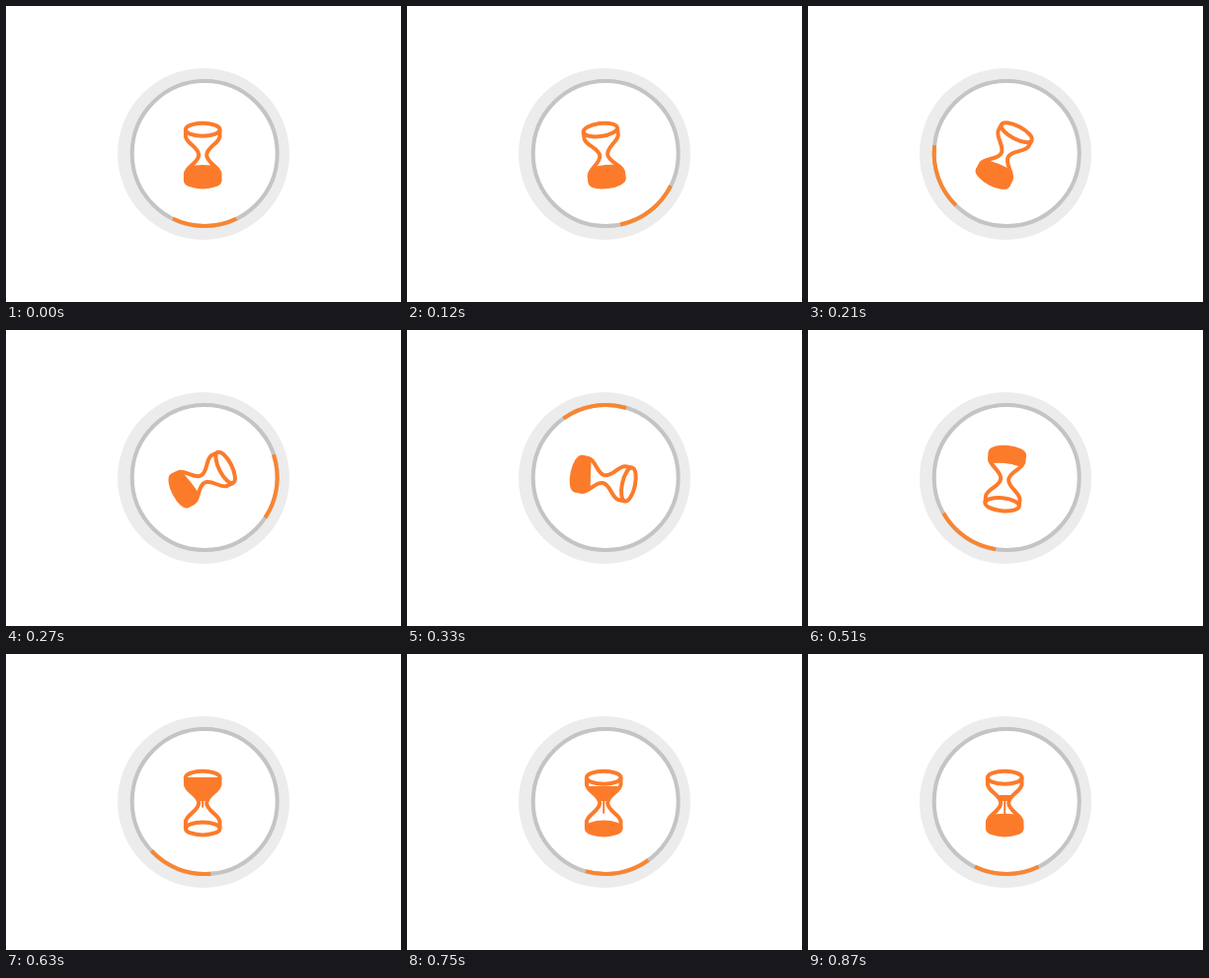
Write an HTML page with a canvas that moves like this. It is 400 px wide and 300 px high and loops after 0.9 s.

```html
<!DOCTYPE html>
<html lang="en">
<head>
<meta charset="utf-8">
<title>Hourglass loader</title>
<style>
  html, body { margin: 0; width: 400px; height: 300px; overflow: hidden; background: #fff; }
  canvas { display: block; }
</style>
</head>
<body>
<canvas id="stage" width="400" height="300"></canvas>
<script>
const ctx = document.getElementById('stage').getContext('2d');
const LOOP = 900, STEP = 30, POUR = 540;
const ORANGE = '#fc7b2b', ARC = '#f98530';
const RIM = { x: 17.3, y: 6.5, at: 25.8 };
const rad = Math.PI / 180;

// One half of the glass, from rim to neck; turned by 180 degrees for the other.
const half = new Path2D(`M-17.3,-25.8 V-19 C-17,-12 -4,-8 -4,0 H4 C4,-8 17,-12 17.3,-19
  V-25.8 A17.3,6.5 0 0 0 -17.3,-25.8 Z`);
const wall = new Path2D('M-17.3,-25.8 V-19 C-17,-12 -4,-8 -4,0 C-4,8 -17,12 -17.3,19 V25.8');
const body = new Path2D(half);
body.addPath(half, new DOMMatrix([-1, 0, 0, -1, 0, 0]));

// Eases from 0 to 1 between two times; a higher power gives a steeper middle.
function ease(t, start, end, power = 2) {
  const u = Math.min(1, Math.max(0, (t - start) / (end - start)));
  return u ** power / (u ** power + (1 - u) ** power);
}

// Both turns wind back, swing past the end and settle.
const spin = t => -47 * ease(t, 0, 110) + 802 * ease(t, 35, 540, 2.78)
  - 45 * ease(t, 550, 750) + 10 * ease(t, 750, 870);
const tilt = t => -14.5 * ease(t, 0, 110) + 204 * ease(t, 75, 540, 1.5)
  - 9.5 * ease(t, 540, 620);

function circle(x, y, r, from = 0, to = 360) {
  ctx.beginPath();
  ctx.arc(x, y, r, from * rad, to * rad);
}

function sand(end, surface, bulge, slope) {
  ctx.beginPath();
  ctx.moveTo(-20, end);
  ctx.lineTo(20, end);
  ctx.lineTo(20, surface - slope);
  ctx.quadraticCurveTo(0, surface + bulge, -20, surface + slope);
  ctx.fill();
}

function drawRing(t) {
  ctx.fillStyle = '#ececec';
  circle(200, 150, 87);
  ctx.fill();
  ctx.fillStyle = '#fff';
  ctx.strokeStyle = '#c4c4c4';
  ctx.lineWidth = 4;
  circle(201.2, 149.5, 73.5);
  ctx.fill();
  ctx.stroke();
  const middle = 90 + spin(t);
  ctx.strokeStyle = ARC;
  circle(201.2, 149.5, 73.5, middle - 26, middle + 26);
  ctx.stroke();
}

function drawHourglass(t) {
  const angle = tilt(t) * rad;
  const poured = Math.max(0, t - POUR);
  ctx.save();
  ctx.translate(199.2, 151.1);
  ctx.rotate(angle);
  ctx.fillStyle = ctx.strokeStyle = ORANGE;

  ctx.save();
  ctx.clip(body);
  const front = Math.max(2, 13 - poured * .19);
  sand(33 - poured * .0758, front, poured ? 0 : -6 * Math.cos(angle), 4 * Math.sin(angle));
  if (poured) {
    const level = -34 + Math.max(0, poured - 90) * .085;
    sand(-34, level, 6, 0);
    const tip = Math.max(level, -poured * .05);
    ctx.fillRect(-1, tip, 2, 4 - tip);
  }
  ctx.restore();

  ctx.lineWidth = 4;
  ctx.lineJoin = 'round';
  for (const side of [1, -1]) {
    ctx.save();
    ctx.scale(side, side);
    ctx.stroke(wall);
    ctx.beginPath();
    ctx.ellipse(0, RIM.at, RIM.x, RIM.y, 0, 0, 2 * Math.PI);
    ctx.stroke();
    ctx.restore();
  }
  ctx.restore();
}

function frame() {
  const t = Math.floor(performance.now() % LOOP / STEP) * STEP;
  ctx.fillStyle = '#fff';
  ctx.fillRect(0, 0, 400, 300);
  drawRing(t);
  drawHourglass(t);
  requestAnimationFrame(frame);
}
frame();
</script>
</body>
</html>
```
